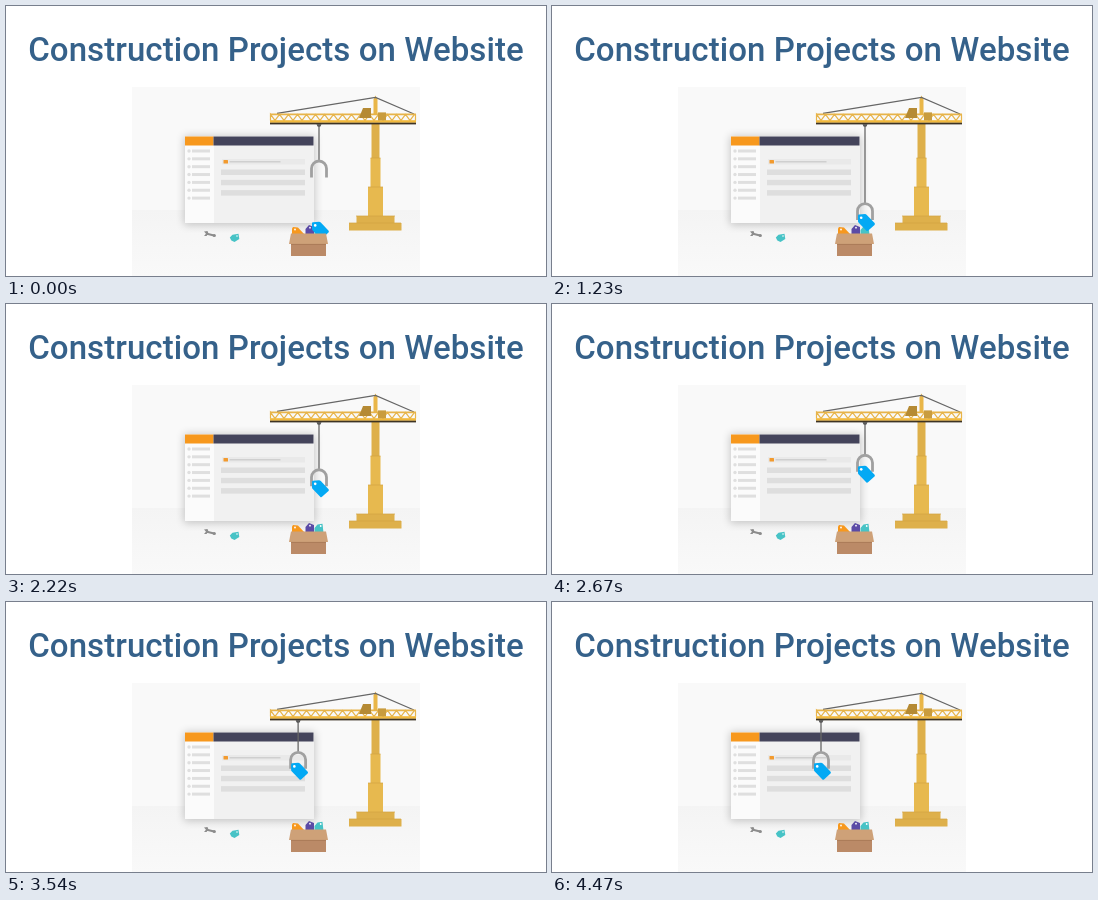
An HTML page for the animation above (4840 ms loop, 540 px wide and 270 px high).

```html
<!DOCTYPE html>
<html lang="en">
<head>
<meta charset="utf-8">
<title>Construction Projects on Website</title>
<style>
  html, body { margin: 0; width: 100%; height: 100%; overflow: hidden; background: #fff; }
  svg { display: block; width: 540px; height: 270px; }
  .title { font: 500 33px Roboto, "Open Sans", sans-serif; letter-spacing: .06px; fill: #35618a; }
</style>
</head>
<body>
<svg viewBox="0 0 540 270">
  <defs>
    <linearGradient id="floor" x2="0" y2="1">
      <stop offset="0" stop-color="#f4f4f4"/>
      <stop offset="1" stop-color="#f9f9f9"/>
    </linearGradient>
    <filter id="soft" x="-20%" y="-20%" width="140%" height="140%">
      <feGaussianBlur stdDeviation="4"/>
    </filter>
    <g id="tag">
      <path d="M-6 12.500L0 12Q1 12 1.800 12.800L9.600 21Q10.300 22 9.500 22.800L3 28.600Q2 29.300 1.200 28.400L-6.500 20.500Q-7 20-7 19V13.500Q-7 12.600-6 12.500Z"/>
      <circle cx="-3.800" cy="15.600" r="1.300" fill="#fff"/>
    </g>
  </defs>

  <text class="title" x="270" y="55" text-anchor="middle">Construction Projects on Website</text>

  <rect x="126" y="81" width="288" height="189" fill="#f9f9f9"/>
  <rect x="126" y="204" width="288" height="66" fill="url(#floor)"/>

  <!-- browser window -->
  <rect x="178" y="130" width="131" height="89" fill="#000" opacity=".2" filter="url(#soft)"/>
  <rect x="179" y="130" width="129" height="87" fill="#f1f1f1"/>
  <rect x="179" y="139" width="29" height="78" fill="#fbfbfb"/>
  <rect x="179" y="130.500" width="28.500" height="9" fill="#f7981d"/>
  <rect x="207.500" y="130.500" width="100" height="9" fill="#44445b"/>
  <g id="menu" fill="#dfdfdf"></g>
  <rect x="216" y="153" width="83" height="5.500" fill="#e9e9e9"/>
  <rect x="217.500" y="154" width="4.500" height="3.500" rx=".5" fill="#f29a2e"/>
  <rect x="223.500" y="155" width="51" height="1.500" fill="#cfcfcf"/>
  <g id="rows" fill="#dedede"></g>

  <!-- crane mast -->
  <g fill="#deb04b">
    <path d="M365.500 118H373.500V152H365.500Z"/>
    <path d="M350.500 210H388.500V217H395.500V224.500H343V217H350.500Z"/>
  </g>
  <path d="M364.500 152H374.500V181H377V210H362V181H364.500Z" fill="#e7b94f"/>
  <path d="M343 217h52M350 210h39M362 181h15M364.500 152h10" stroke="#d0a23f" stroke-width=".7"/>

  <!-- crane jib -->
  <g transform="translate(0 -.6)">
    <path d="M369.500 90L371.500 94V109H367.500V94Z" fill="#e9b648"/>
    <path d="M271 108L369.500 92L408 108.500" fill="none" stroke="#666" stroke-width="1.100"/>
    <path id="lattice" fill="none" stroke="#e7b44a" stroke-width="1.200"/>
    <path d="M264 109H410" stroke="#e7b44a" stroke-width="1.600"/>
    <rect x="264" y="114.800" width="146" height="2.600" fill="#f2b93c"/>
    <rect x="264" y="117.300" width="146" height="1.700" fill="#3d3324"/>
    <path d="M357 102.500H365V112.500H353Z" fill="#b58a34"/>
    <rect x="372" y="107" width="8" height="8" fill="#c99c3e"/>
  </g>

  <!-- tools on the floor -->
  <path d="M200 227.500L208 229.500" stroke="#8c8c8c" stroke-width="2"/>
  <path d="M198 225.500L201.500 225L202.500 227.500L200.500 230L198 230L200 227.800Z" fill="#8c8c8c"/>
  <circle cx="208.300" cy="229.500" r="1.600" fill="#8c8c8c"/>
  <path d="M223.800 231.500L226.500 228.800L232.500 227.800L233.300 233L228.500 236L225.300 234.600Z" fill="#47c3c6"/>
  <circle cx="231" cy="230" r=".8" fill="#fff"/>

  <!-- tags inside the box -->
  <path d="M286 222.500L287 221L292 221.500L299 229H286Z" fill="#f7981d"/>
  <circle cx="289" cy="223.500" r=".9" fill="#fff"/>
  <path d="M299.500 223L303 219L308 221V229H299.500Z" fill="#5b4ba6"/>
  <circle cx="304" cy="221.700" r=".9" fill="#fff"/>
  <path d="M308.500 224L311.500 220.500L316.500 219.800L317.500 229H308.500Z" fill="#47c3c6"/>
  <circle cx="314.700" cy="222" r=".9" fill="#fff"/>

  <!-- moving load -->
  <path id="trolley" d="M-2.500 118.200H2.500L1.200 120.700H-1.200Z" fill="#444"/>
  <path id="cable" stroke="#666" stroke-width="1.300"/>
  <path id="hook" d="M-7.500 18V9A7.500 7.500 0 0 1 7.500 9V18" fill="none" stroke="#a0a0a0" stroke-width="2.800"/>
  <use id="load" href="#tag" fill="#03a9f4"/>

  <!-- cardboard box -->
  <path d="M285 227.500H320L322 238H283Z" fill="#cea178"/>
  <rect x="285" y="238" width="35" height="12" fill="#bb8a67"/>
  <path d="M285 238.400H320" stroke="#a67853" stroke-width=".8"/>
</svg>
<script>
  const LOOP = 4840, STEP = 30;
  const $ = id => document.getElementById(id);
  const repeat = (n, fn) => Array.from({ length: n }, (_, i) => fn(i)).join('');

  $('menu').innerHTML = repeat(7, i => {
    const y = 145 + i * 7.85;
    return `<circle cx="183" cy="${y}" r="1.7"/><rect x="186" y="${y - 1.5}" width="18" height="3"/>`;
  });
  $('rows').innerHTML = repeat(3, i =>
    `<rect x="215" y="${163.5 + i * 10.3}" width="84" height="5.5"/>`);
  $('lattice').setAttribute('d', 'M264.500 115V109' +
    repeat(16, i => `L${269 + i * 9} 115L${273.5 + i * 9} 109`) + 'M409.500 115V109');

  // time, hook x, hook y
  const GRAB = 990;
  const path = [
    [0, 313, 153.5],
    [GRAB, 313, 203.8],
    [2700, 313, 148.8],
    [4470, 269, 148.8],
    [LOOP, 269, 148.8]
  ];

  function hookAt(t) {
    const i = path.findIndex(p => p[0] > t);
    const a = path[i - 1], b = path[i];
    const k = (t - a[0]) / (b[0] - a[0]);
    return [1, 2].map(n => a[n] + (b[n] - a[n]) * k);
  }

  const move = (id, x, y) => $(id).setAttribute('transform', `translate(${x} ${y})`);

  function draw(t) {
    const [x, y] = hookAt(t);
    move('trolley', x, 0);
    move('hook', x, y);
    $('cable').setAttribute('d', `M${x} 119V${y + 1}`);
    move('load', x, t < GRAB ? path[1][2] : y);
  }

  const start = performance.now();
  function frame() {
    const t = (performance.now() - start) % LOOP;
    draw(Math.floor(t / STEP) * STEP);
    requestAnimationFrame(frame);
  }
  frame();
</script>
</body>
</html>
```
